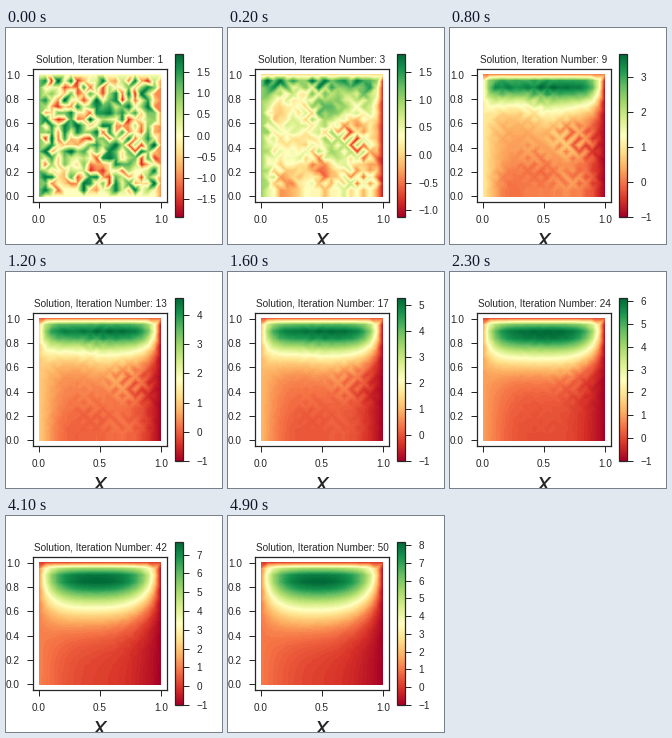
A matplotlib script for the animation above (5 s loop, 216 by 216 pixels).

```python
import matplotlib.pyplot as plt
import numpy as np
from matplotlib.animation import FuncAnimation
from matplotlib.cm import ScalarMappable
from matplotlib.tri import Triangulation

SIZE = 216
DPI = 72
FRAMES = 50
NODES = 20
LEVELS = 100
CMAP = "RdYlGn"
INK = "0.15"

plt.rcParams.update({
    "font.family": "Liberation Sans",
    "font.size": 10,
    "text.color": INK,
    "axes.edgecolor": INK,
    "axes.linewidth": 1.25,
    "xtick.color": INK,
    "ytick.color": INK,
    "xtick.major.size": 6,
    "ytick.major.size": 6,
    "xtick.major.width": 1,
    "ytick.major.width": 1,
    "xtick.major.pad": 7,
    "ytick.major.pad": 7,
})

axis = np.linspace(0, 1, NODES)
X, Y = np.meshgrid(axis, axis)
grid = Triangulation(X.ravel(), Y.ravel())
source = 1.29 * Y**8


def fix_sides(u):
    u[:, 0] = 1
    u[:, -1] = -1
    u[-1] = 0


def jacobi_step(u):
    new = u.copy()
    neighbours = u[:-2, 1:-1] + u[2:, 1:-1] + u[1:-1, :-2] + u[1:-1, 2:]
    new[1:-1, 1:-1] = neighbours / 4 + source[1:-1, 1:-1]
    new[0] = new[1]  # insulated bottom edge
    fix_sides(new)
    return new


def solve():
    u = np.random.default_rng(4).uniform(-1.92, 1.92, X.shape)
    u[0] = 0
    fix_sides(u)
    history = [u]
    while len(history) < FRAMES:
        history.append(jacobi_step(history[-1]))
    return history


def pixel_rect(left, bottom, width, height):
    return [v / SIZE for v in (left, bottom, width, height)]


solutions = solve()

fig = plt.figure(figsize=(SIZE / DPI, SIZE / DPI), dpi=DPI, facecolor="white")
ax = fig.add_axes(pixel_rect(27, 41.57, 133.92, 133.92))
cax = fig.add_axes(pixel_rect(169.3, 27, 8.15, 163.08))
title = ax.set_title("", fontsize=10, pad=6)
fig.text(94.5 / SIZE, -3 / SIZE, "$x$", fontsize=24, ha="center", va="baseline")
scale = ScalarMappable(cmap=CMAP)
scale.set_clim(-1, 1)
bar = fig.colorbar(scale, cax=cax)


def update(frame):
    u = solutions[frame]
    low, high = u.min(), u.max()
    for old in list(ax.collections):
        old.remove()
    ax.tricontourf(grid, u.ravel(), np.linspace(low, high, LEVELS), cmap=CMAP)
    ax.set(xlim=(-0.05, 1.05), ylim=(-0.05, 1.05),
           xticks=[0, 0.5, 1], yticks=np.linspace(0, 1, 6))

    scale.set_clim(low, high)
    step, digits = (0.5, 1) if high - low < 4.5 else (1, 0)
    first, last = np.ceil(low / step - 1e-9), np.floor(high / step + 1e-9)
    ticks = np.arange(first, last + 1) * step
    labels = [f"{t + 0.0:.{digits}f}".replace("-", "\u2212") for t in ticks]
    bar.set_ticks(ticks, labels=labels)
    title.set_text(f"Solution, Iteration Number: {frame + 1}")
    return ax.collections


anim = FuncAnimation(fig, update, frames=FRAMES, interval=100, repeat=True)
plt.show()
```
